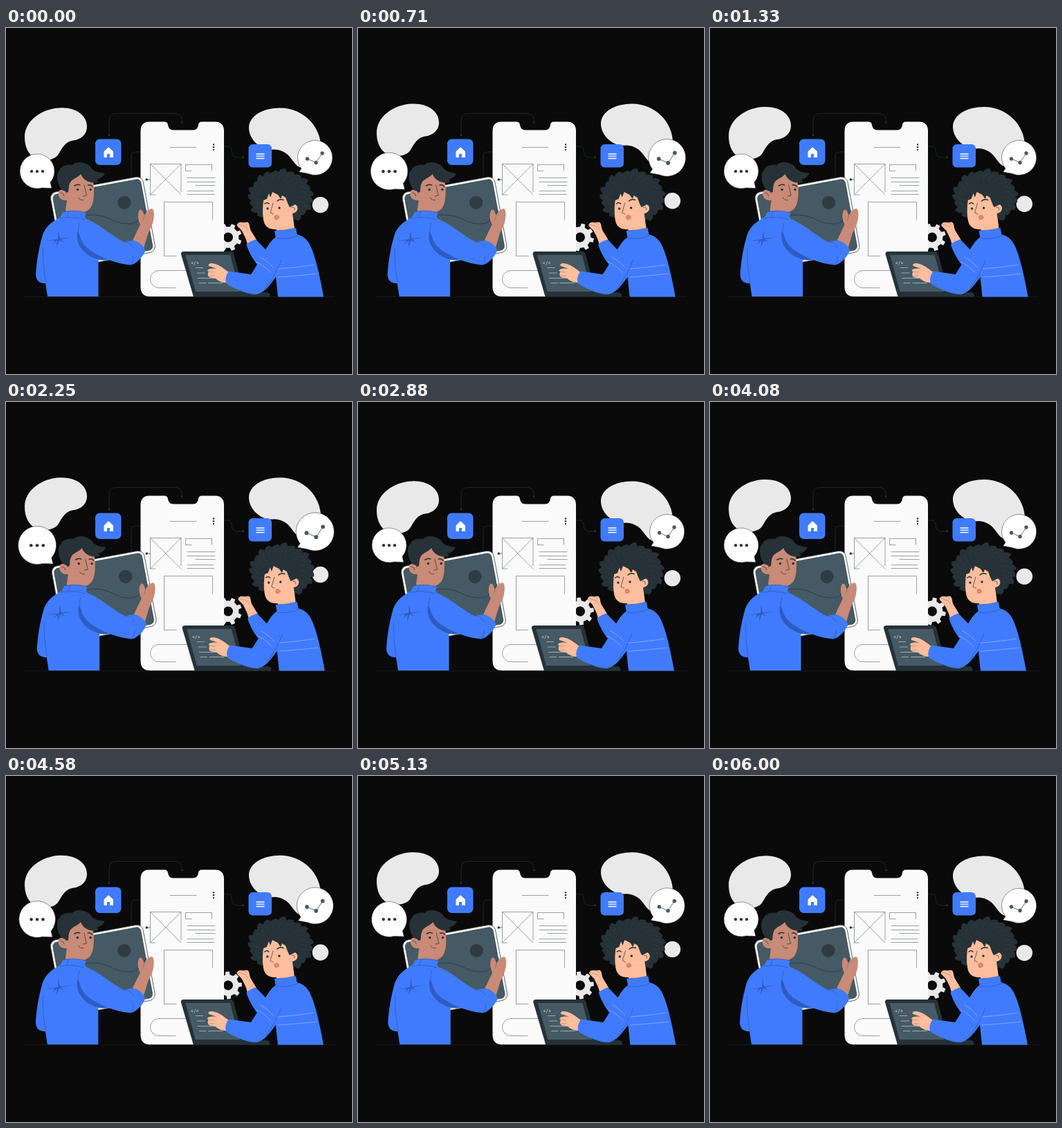
An HTML page that plays this animation: 500x500 px, repeating every 6.04 s.

```html
<!DOCTYPE html>
<html lang="en">
<head>
<meta charset="utf-8">
<style>
html, body { margin: 0; width: 100%; height: 100%; overflow: hidden; background: #0a0a0a; }
svg { display: block; width: 100%; height: 100%; }
.blue { fill: #407bff; }
.dark { fill: #263238; }
.slate { fill: #455a64; }
.pale { fill: #e9e9e9; }
.white { fill: #fafafa; }
.tan { fill: #c98a77; }
.peach { fill: #ffbe9d; }
.shade { fill: #2d5cc4; }
.bubble { fill: #fff; stroke: #263238; stroke-width: .5; }
.line { fill: none; stroke: #263238; stroke-width: .7; stroke-linecap: round; stroke-linejoin: round; }
.thin { stroke-width: .45; }
.brow { stroke-width: 1.6; }
.seam { fill: none; stroke: #2a55b5; stroke-width: .7; stroke-linecap: round; }
.stripe { fill: none; stroke: #a9c4ff; stroke-width: .8; stroke-dasharray: 2 .6; }
.icon { fill: none; stroke: #fff; stroke-width: 1.3; }
.code { fill: none; stroke: #c5ced2; stroke-width: .7; }
</style>
</head>
<body>
<svg viewBox="0 0 500 500">
  <path d="M25 388.5H475" stroke="#191e20" stroke-width=".8"/>

  <g id="blobs" class="pale">
    <path d="M78 115C101 114 117 126 117 142C117 155 106 161 97 162C84 164 80 176 75 183C68 193 46 192 38 185C30 178 27 168 27 157C27 133 52 116 78 115Z"/>
    <path d="M396 115C430 115 455 142 455 172C455 200 440 206 428 202C412 198 414 177 388 175C368 178 351 160 351 144C351 126 372 115 396 115Z"/>
    <circle cx="454.3" cy="255.2" r="11.7"/>
  </g>

  <g class="line">
    <path d="M149 155V134Q149 123.5 159 123.5H243Q254 123.5 254 132V136M195 179H188Q181 179 181 186V219H208M315 171H321Q326 171 326 177Q326 187 335 187H342"/>
    <g class="dark"><circle cx="149" cy="155" r="1.2"/><circle cx="342.5" cy="187" r="1.2"/></g>
  </g>

  <g id="gear" class="pale"></g>

  <path class="white" d="M207 135.5H229Q233.5 135.5 234 140Q235 147.5 242 147.5H270Q277 147.5 278 140Q278.5 135.5 283 135.5H302Q315 135.5 315 149V388H208Q194.5 388 194.5 374V149Q194.500 135.5 207 135.5Z"/>
  <g class="line thin">
    <path d="M237 172.5H275M216 241H208.5V196.5H253V237M208.5 196.5L253 241M253 196.5L208.5 241"/>
    <path d="M268 206.5H259.5V197.5H297.5V206M262 216.500H302M262 222.5H302M274 227.5H302M262 235.500H300M262 240.5H301"/>
    <path d="M246 329.5H228.5V251.5H298.5V277M245 375.5H221A12.5 12.5 0 0 1 221 350.5H285"/>
  </g>
  <g class="dark">
    <circle cx="300" cy="168.5" r="1.2"/><circle cx="300" cy="172.3" r="1.2"/><circle cx="300" cy="176.1" r="1.2"/>
    <circle cx="254.5" cy="136.3" r="1.4"/>
  </g>

  <rect class="blue" x="129" y="160.5" width="37.5" height="37.5" rx="6.5"/>
  <path fill="#fff" d="M148 172L155 178.5V187H150V182H146V187H141.5V178.5Z"/>
  <rect class="blue" x="350.5" y="168" width="33.5" height="33.5" rx="6"/>
  <path class="icon" d="M361.5 182H373.5M361.5 185.2H373.5M361.5 188.5H373.5"/>

  <g id="talk">
    <path class="bubble" d="M66 231.5L52 231A25 25 0 1 1 64 223.3Z"/>
    <g class="dark"><circle cx="37" cy="207.2" r="2.1"/><circle cx="45" cy="207.2" r="2.1"/><circle cx="53" cy="207.2" r="2.1"/></g>
  </g>
  <g id="chart">
    <path class="bubble" d="M423.5 208L427 202.9A25 25 0 1 1 437 210.5Z"/>
    <path class="line" d="M435.5 189L448 194.5L457 181"/>
    <g class="slate"><circle cx="435.5" cy="189" r="2.7"/><circle cx="448" cy="194.5" r="2.7"/><circle cx="457" cy="181" r="2.7"/></g>
  </g>

  <g id="man">
    <g transform="translate(141 281) rotate(-10.5)">
      <rect class="white" x="-69" y="-56" width="136" height="111" rx="9" stroke="#263238" stroke-width=".7"/>
      <rect class="slate" x="-65.5" y="-52.500" width="129" height="104" rx="6" stroke="#263238" stroke-width=".6"/>
    </g>
    <circle cx="171" cy="252.3" r="9.6" fill="#303c43"/>
    <path class="line" d="M108 272C150 264 150 284 180 283C193 282 198 268 204 263"/>

    <path class="tan" d="M183 307L194 284C190 276 190 268 193 263C197 261 198 266 200 271C202 266 206 262 211 261C215 263 214 272 213 278C211 288 206 294 205 298L199 318C195 312 190 308 183 307Z"/>
    <path class="line thin" d="M200 271L198 278" opacity=".6"/>
    <path class="blue" d="M79 273C67 279 57 287 53 299C47 319 44 339 43 357C44 367 50 369 57 369L60 388H133.5V328L115 274Z"/>
    <path class="shade" d="M103 294C101 308 106 318 117 327C128 334 138 337 148 335L117 314Z"/>
    <path class="blue" d="M113 275C133 281 150 299 170 309L183 307C194 309 200 316 201.500 322C196 333 188 341 180 342.5C160 341 136 332 117 318C104 308 103 284 113 275Z"/>
    <path class="seam" d="M53.5 318C53 338 55 352 57.5 368M106 282C102 296 106 308 118 318M170 309C178 309 181 312 184 318M180 342Q185 337 184 329"/>
    <path class="shade" d="M56 308Q66 306.5 75 305L76 292L78 304L97 302.5L79 305.500L84 310L77 307L73 317L74 307L67 313L71 307Z"/>

    <path class="tan" d="M87 240C84 224 90 205 108 205C121 205 127 217 127 232C127 244 127 257 119 263C109 270 91 268 86 264L88 249C80 250 74 244 76 237C78 231 85 234 87 240Z"/>
    <path class="blue" d="M78 275L82 266C93 263 106 264 116 267L113 277C100 273 88 273 78 275Z"/>
    <path class="seam" d="M78 275C90 273 101 273 113 277M82 266C93 263 106 264 116 267M91 265L88 273"/>
    <path class="dark" d="M88 238L80 233C73 225 72 208 78 205C78 200 91 196 96 198C102 191 115 194 122 200C124 206 133 209 143 210C139 217 135 218 131 219C136 222 133 224.500 127 223.500C118 223 111 219 108 211C104 217 95 217 92 225C90 229 91 233 90 237Z"/>
    <g class="dark"><circle cx="103.5" cy="233.5" r="1.7"/><circle cx="122.3" cy="233.500" r="1.700"/></g>
    <path class="line brow" d="M99 228Q103 225 107 227M118.5 227Q122 226 125 229"/>
    <path class="line" d="M113 227L116.5 242L111.5 243M104.5 245Q107.5 250 112 248.5M79 238Q83 238 84 243"/>
  </g>
  <g class="dark"><path class="line" d="M203 219H208"/><circle cx="203.3" cy="219" r="1.7"/></g>

  <g id="woman">
    <path class="dark" d="M253 327Q252.5 323 257 323H324Q328 323 329 326L344 382H378Q383 384 381 388.5H271Z"/>
    <path class="slate" d="M259.5 328H324L338 381H274Z"/>
    <text x="267.5" y="342" font-family="Roboto, 'Liberation Sans', sans-serif" font-size="7" letter-spacing=".5" fill="#dfe5e7">&lt;/&gt;</text>
    <path class="code" d="M274 346.5H285M276 354H288M277 361.5H314M279 368.5H289M292 368.5H313"/>

    <path class="peach" d="M349 313C347 303 343 298 341 293L334 286C333 282 337 280 343 281L349 280.5C353 283 351 287 354 293L362 306Z"/>
    <path class="line thin" d="M336 284L346 287L350 292M341 281L349 284" opacity=".6"/>
    <path class="blue" d="M347.5 313C351 309 357 307 361 305.5L376 321L363 342C356 333 350 322 347.5 313Z"/>

    <path id="hair" class="dark"/>
    <g id="curls" class="line thin" style="stroke:#37474f"></g>
    <path class="peach" d="M373 244C371 254 370 270 373 281C376 290 384 291 391 291L390 299Q405 303 418 297L414 268C422 267 424 258 418 255C414 253 412 256 411 259L405 238C395 231 379 232 373 244Z"/>
    <path class="dark" d="M367 240C378 222 400 224 416 238L418 255L410 259C407 254 406 250 404 245L399 242L397 247L393 241L385 237L382 245L380 239L377 247L372 249Z"/>
    <path class="line brow" d="M374 254Q377 251 380 254M392 250Q396 246.5 401 248.5"/>
    <g class="dark"><circle cx="378" cy="261" r="1.7"/><circle cx="395" cy="260" r="1.7"/></g>
    <path class="line" d="M386 253L382 267L386.5 269M413 259Q418 258 417 263"/>
    <path d="M388 272Q391 269 393 271L395 274Q392 278 388.5 276Z" fill="#e58a6c" stroke="#8f4a3a" stroke-width=".4"/>

    <path class="peach" d="M322 353C314 347 306 340 296 340C291 341 292 344 296 345L303 347.5C297 347 291 348 291 351C294 352 291 354 292 358C294 362 299 360 303 362C308 367 314 368 319 368Z"/>
    <path class="line thin" d="M296 345L304 348M292 352L301 353M294 358L301 358" opacity=".6"/>
    <path class="blue" d="M390 302C378 310 372 328 361 345L354 356L322 351.5C317 358 316 366 319 370C335 379 350 385 362 385C375 382 382 370 390 360L393 388.5H459C453 355 447 330 440 315C436 305 428 300 420 298Z"/>
    <path class="blue" d="M388 293Q404 293 419 289L421 300Q407 306 390 304Z"/>
    <path class="seam" d="M388 293Q404 293 419 289M390 304Q407 306 421 300M398 335C392 350 386 362 376 375"/>
    <path class="stripe" d="M393 348Q420 346 445 342M393 360Q423 358 449 355M367 331Q377 336 386 346M362 338Q373 343 383 354"/>
  </g>
</svg>
<script>
const el = id => document.getElementById(id);
const move = (id, value) => el(id).setAttribute('transform', value);
const polar = (cx, cy, rx, ry, a) => `${cx + rx * Math.cos(a)} ${cy + ry * Math.sin(a)}`;

function drawGear() {
  const teeth = 8, step = Math.PI * 2 / teeth;
  let d = '';
  for (let i = 0; i < teeth; i++) {
    for (const [offset, r] of [[-.27, 15.5], [-.18, 20], [.18, 20], [.27, 15.5]]) {
      d += (d ? 'L' : 'M') + polar(0, 0, r, r, (i + .5 + offset) * step);
    }
  }
  d += 'ZM7 0A7 7 0 1 0 -7 0A7 7 0 1 0 7 0Z';
  el('gear').innerHTML = `<path fill-rule="evenodd" d="${d}"/>`;
}

function drawHair() {
  const tufts = 23, step = Math.PI * 2 / tufts;
  const at = (r, a) => polar(397, 244, r, r * .84, a);
  let d = 'M' + at(43, 0), curls = '';
  for (let i = 0; i < tufts; i++) {
    const a = i * step, grow = 1.8 * Math.sin(i * 2.3);
    d += 'Q' + at(47 + grow, a + step * .2) + ' ' + at(47.5 + grow, a + step * .75);
    d += 'L' + at(43, a + step);
    curls += `<path d="M${at(28, a)}Q${at(35, a - .1)} ${at(39, a + .16)}"/>`;
  }
  el('hair').setAttribute('d', d + 'Z');
  el('curls').innerHTML = curls;
}

// Linear interpolation through [position, value] stops.
function along(stops, p) {
  const i = Math.max(1, stops.findIndex(s => s[0] >= p));
  const [p0, v0] = stops[i - 1], [p1, v1] = stops[i];
  return v0 + (v1 - v0) * (p - p0) / (p1 - p0);
}

const LOOP = 6040, LONG = 6000, BEAT = 1500;
const lift = [[0, .4], [.5, -5.8], [1, .4]];
const pulse = [[0, 1], [.1, 1.1], [.3, 1], [.4, 1], [.5, 1.1], [.6, 1], [1, 1]];
const sway = [0, -1, 2, -4, 4, -4, 4, -4, 2, -1, 0].map((x, i) => [i / 10, x * .85]);

const scaleAt = (x, y, s) => `translate(${x} ${y}) scale(${s}) translate(${-x} ${-y})`;

function frame(now) {
  const t = now % LOOP, p = t % BEAT / BEAT;
  const shift = along(sway, t % LONG / LONG), beat = along(pulse, p);
  move('blobs', `translate(0 ${along(lift, p)})`);
  move('gear', `translate(321 302.5) rotate(${p * 360})`);
  move('talk', scaleAt(45, 207, beat));
  move('chart', scaleAt(446.7, 187.5, beat));
  move('man', `translate(${shift} 0)`);
  move('woman', `translate(${shift} 0)`);
  requestAnimationFrame(frame);
}

drawGear();
drawHair();
const start = performance.now();
requestAnimationFrame(function first(now) { frame(Math.max(0, now - start)); });
</script>
</body>
</html>
```
